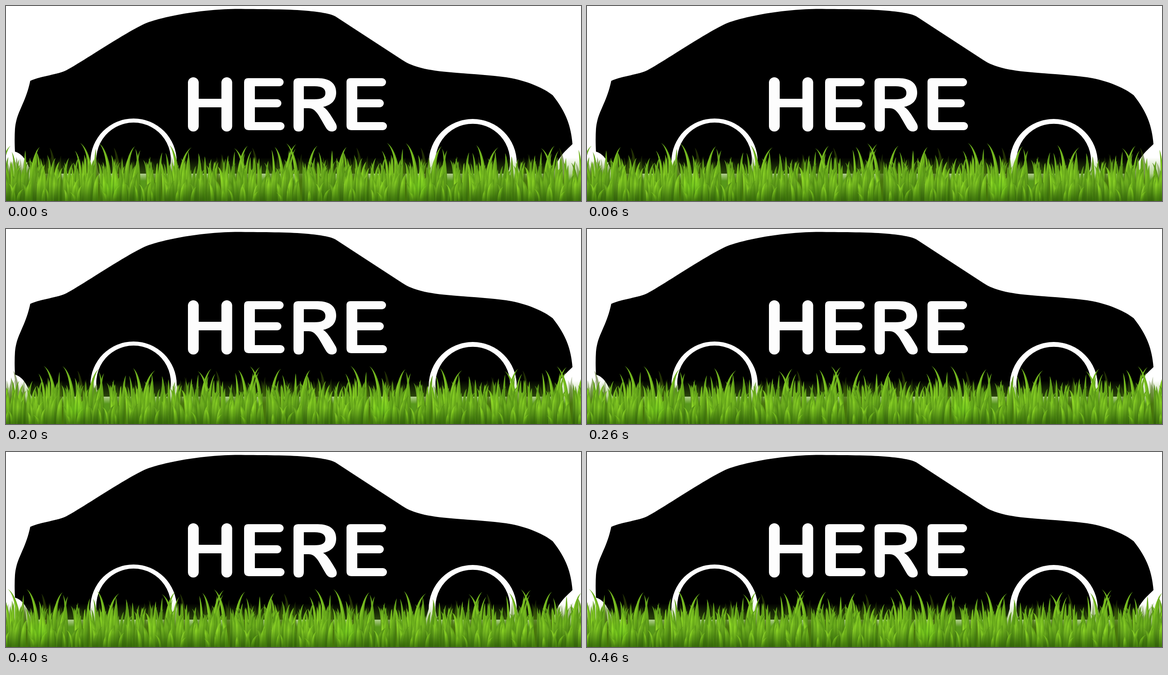
Animation of 1280x435 px, one loop 500 ms. Source, as an HTML page with a canvas:

```html
<!DOCTYPE html>
<html lang="en">
<head>
<meta charset="utf-8">
<title>Car in the grass</title>
<style>
  html, body { margin: 0; width: 100%; height: 100%; overflow: hidden; background: #fff; }
  #stage { position: relative; width: 1280px; height: 435px; overflow: hidden; }
  svg, canvas { position: absolute; left: 0; top: 0; display: block; }
</style>
</head>
<body>
<div id="stage">
  <svg width="1280" height="435" viewBox="0 0 1280 435" role="img" aria-label="HERE">
    <path d="M54 167C78 156 116 153 135 143C175 121 264 60 310 39C345 25 430 7 515 6.500
      C560 7 620 7 655 9.500C690 12 720 16 733 23L880 119C896 130 920 141 975 146.500
      C1030 152 1085 154 1125 161C1165 169 1198 184 1217 199C1242 231 1257 260 1261 308
      C1244 325 1226 338 1219 374H57C48 350 39 330 20 325C19 306 19 290 20 274C23 236 43 219 54 167Z"/>
    <path fill="#fff" d="M185 374L188 347A96 96 0 0 1 380 347L386 374ZM934 374L941 350A98 98 0 0 1 1137 350L1144 374Z"/>
    <path d="M207 374A83 83 0 1 1 361 374ZM961 374A83 83 0 1 1 1117 374Z"/>
    <g fill="#fdfdfd">
      <path d="M417 171V268M491.500 171V268" stroke="#fdfdfd" stroke-width="24" stroke-linecap="round"/>
      <path d="M417 207H491V226H417Z"/>
      <path id="e" d="M539 161H609a9 9 0 0 1 0 18H554V208H604a9 9 0 0 1 0 18H554V259H611
        a9 9 0 0 1 0 18H541Q530 277 530 266V170Q530 161 539 161Z"/>
      <use href="#e" x="228"/>
      <path fill-rule="evenodd" d="M650 161H694C721 161 735 173 735 193C735 210 725 221 706 225
        C716 231 724 245 734 262C740 274 733 280 726 280C719 280 715 277 710 268
        C697 246 690 228 674 228H663V267C663 276 659 280 651.500 280C644 280 640 276 640 267V171
        Q640 161 650 161ZM663 179V208H687C703 208 711 204 711 194C711 184 703 179 687 179Z"/>
    </g>
  </svg>
  <canvas id="grass" width="1450" height="435"></canvas>
</div>
<script>
const TILE = 683, FLOOR = 435, ROOT = 440;
const grass = document.getElementById('grass');
const tile = document.createElement('canvas');
tile.width = TILE;
tile.height = FLOOR;
const ctx = tile.getContext('2d');

let seed = 29;
function rnd(min, max) {
  seed = (seed * 16807) % 2147483647;
  return min + (max - min) * seed / 2147483647;
}

// Repeats a drawing one tile to each side so the strip joins up.
function wrapped(draw) {
  for (const shift of [-TILE, 0, TILE]) {
    ctx.save();
    ctx.translate(shift, 0);
    draw();
    ctx.restore();
  }
}

function vertical(y0, y1, colours) {
  const g = ctx.createLinearGradient(0, y0, 0, y1);
  colours.forEach((c, i) => g.addColorStop(i / (colours.length - 1), c));
  return g;
}

function outline(x, y, root, left, right) {
  const bend = y + (ROOT - y) * 0.16;
  ctx.beginPath();
  ctx.moveTo(root + left, ROOT);
  ctx.quadraticCurveTo(root + left * 0.9, bend, x, y);
  ctx.quadraticCurveTo(root + right * 0.9, bend, root + right, ROOT);
  ctx.fill();
}

// lean: sideways distance from tip to root.
function blade(x, y, lean, width, colours, shade = 0.24) {
  const root = x + lean, half = width / 2;
  wrapped(() => {
    ctx.fillStyle = vertical(y, FLOOR, colours);
    outline(x, y, root, -half, half);
    ctx.fillStyle = `rgba(45, 105, 0, ${shade})`;
    outline(x, y, root, half * 0.1, half);
  });
}

function green(light) {
  const tone = l => `hsl(${87 + (40 - l) * 0.25}, 70%, ${l}%)`;
  return [tone(light), tone(light + 5), tone(light - 2), tone(light - 13)];
}

function row(count, top, bottom, thin, thick, dark, bright, lean = 15) {
  const step = TILE / count;
  for (let i = 0; i < count; i++)
    blade(i * step + rnd(-step, step), rnd(top, bottom), rnd(-lean, lean),
      rnd(thin, thick), green(rnd(dark, bright)));
}

function tall(tips, side) {
  for (const x of tips) blade(x, rnd(305, 317), side * rnd(19, 28), 9.5, green(41));
}

function glow(x, y, r) {
  wrapped(() => {
    const g = ctx.createRadialGradient(x, y, 0, x, y, r);
    g.addColorStop(0, 'rgba(115, 220, 25, .4)');
    g.addColorStop(1, 'rgba(115, 220, 25, 0)');
    ctx.fillStyle = g;
    ctx.fillRect(x - r, y - r, 2 * r, 2 * r);
  });
}

function paintTile() {
  const haze = ctx.createLinearGradient(0, 338, 0, 390);
  haze.addColorStop(0, 'rgba(95, 155, 25, 0)');
  haze.addColorStop(0.68, 'rgba(95, 155, 25, .45)');
  haze.addColorStop(1, '#57981a');
  ctx.fillStyle = haze;
  ctx.fillRect(0, 338, TILE, FLOOR - 338);

  for (let i = 0; i < 70; i++)
    blade(rnd(0, TILE), rnd(328, 350), rnd(-12, 12), 9,
      ['rgba(62, 95, 8, .3)', 'rgba(75, 120, 12, .75)'], 0);
  for (const x of [97, 240, 548])
    blade(x, 316, 12, 11, ['rgba(62, 88, 8, .55)', 'rgba(62, 88, 8, .5)'], 0);

  row(24, 318, 336, 7, 9, 36, 42, 18);
  row(65, 335, 356, 7, 9, 32, 42);
  tall([75, 287, 413, 538, 646, 693], -1);
  tall([165, 207, 364, 508, 598, 624], 1);
  row(85, 344, 368, 8, 11, 32, 44);
  row(70, 358, 394, 9, 13, 33, 45);
  row(28, 392, 416, 5, 8, 40, 49);
  glow(235, 402, 30);

  ctx.fillStyle = vertical(400, FLOOR, ['rgba(50, 110, 0, 0)', 'rgba(50, 110, 0, .4)']);
  ctx.fillRect(0, 400, TILE, FLOOR - 400);
}

paintTile();
const strip = grass.getContext('2d');
for (let x = 0; x < grass.width; x += TILE) strip.drawImage(tile, x, 0);

// The strip hops left every 100 ms, then snaps back.
const SHIFTS = [0, -40, -81, -126, -161];
const hops = [...SHIFTS, SHIFTS[4]].map((x, i) => ({
  transform: `translateX(${x}px)`, offset: i / 5, easing: 'step-end'
}));
grass.animate(hops, { duration: 500, iterations: Infinity });
</script>
</body>
</html>
```
